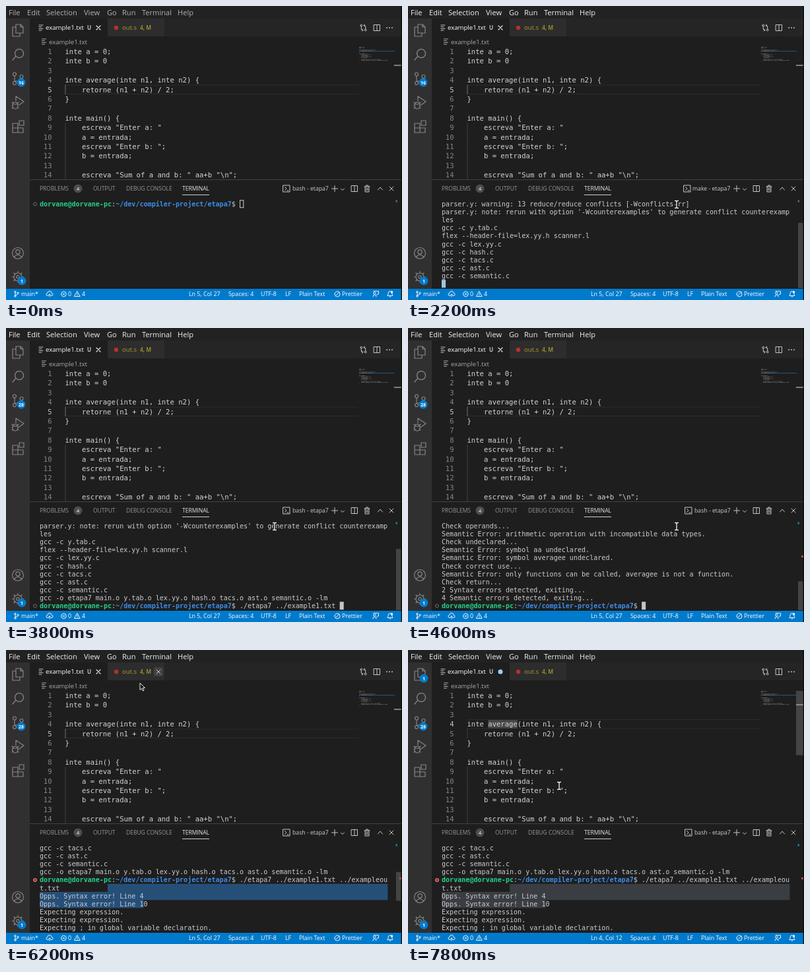
Write an HTML page that moves like this. It is 600 px wide and 446 px high and loops after 8 s.

```html
<!DOCTYPE html>
<html lang="en">
<head>
<meta charset="utf-8">
<title>Compiler demo</title>
<style>
html, body { margin: 0; width: 100%; height: 100%; overflow: hidden; background: #1e1e1e; }
svg { display: block; width: 600px; height: 446px; }
text { white-space: pre; font-family: "Open Sans", "Noto Sans", sans-serif; }
.mono { font-family: "DejaVu Sans Mono", monospace; }
.code { font-size: 10.57px; }
.term { font-size: 10.07px; }
.line { fill: none; stroke-linecap: round; stroke-linejoin: round; }
</style>
</head>
<body>
<svg id="stage" viewBox="0 0 600 446"></svg>
<script>
const LOOP = 8000, STEP = 200;
const CODE = { x: 89.5, y: 62, pitch: 14.4, char: 6.365, bottom: 264 };
const TERM = { x: 51, y: 294.3, pitch: 12.1, char: 6.062, rows: 11, cols: 87 };
const USER = 'dorvane@dorvane-pc', PATH = '~/dev/compiler-project/etapa7';
const prompt = command => `${USER}:${PATH}$ ${command}`;
const RUN = './etapa7 ../example1.txt ../exampleout.txt';

const source = `inte a = 0;
inte b = 0

inte average(inte n1, inte n2) {
    retorne (n1 + n2) / 2;
}

inte main() {
    escreva "Enter a: "
    a = entrada;
    escreva "Enter b: ";
    b = entrada;

    escreva "Sum of a and b: " aa+b "\\n";
    escreva "Average of a and b: " averagee(a, b) "\\n";
}`.split('\n');

const log = `${prompt('make')}
gcc -c main.c
bison -y -d parser.y
parser.y: warning: 2 shift/reduce conflicts [-Wconflicts-sr]
parser.y: warning: 13 reduce/reduce conflicts [-Wconflicts-rr]
parser.y: note: rerun with option '-Wcounterexamples' to generate conflict counterexamples
gcc -c y.tab.c
flex --header-file=lex.yy.h scanner.l
gcc -c lex.yy.c
gcc -c hash.c
gcc -c tacs.c
gcc -c ast.c
gcc -c semantic.c
gcc -o etapa7 main.o y.tab.o lex.yy.o hash.o tacs.o ast.o semantic.o -lm
${prompt(RUN)}
Opps. Syntax error! Line 4
Opps. Syntax error! Line 10
Expecting expression.
Expecting expression.
Expecting ; in global variable declaration.
Check declarations...
Check operands...
Semantic Error: arithmetic operation with incompatible data types.
Check undeclared...
Semantic Error: symbol aa undeclared.
Semantic Error: symbol averagee undeclared.
Check correct use...
Semantic Error: only functions can be called, averagee is not a function.
Check return...
2 Syntax errors detected, exiting...
4 Semantic errors detected, exiting...`.split('\n');

// Each table row is [start in ms, value, ...].
const editorScroll = [[0, 0], [800, 25], [1000, 50], [1400, 25], [1600, 0]];
const session = [ // finished log lines, then typed text (null while a command runs)
  [0, 0, ''], [1800, 0, 'mak'], [2000, 7, null], [2200, 13, null], [2600, 14, ''],
  [3400, 14, './eta'], [3600, 14, './etapa7 ../ex'], [3800, 14, './etapa7 ../example1.txt '],
  [4000, 14, './etapa7 ../example1.txt ../example'], [4200, 14, RUN], [4400, log.length, '']
];
const termTop = [[0, null], [5000, 18], [5200, 11]];
const selectTo = [[0, null], [5400, [16, 24]], [5600, [17, 12]], [5800, [18, 26]]];
const caret = [[0, 5, 27], [6800, 2, 11], [7000, 2, 12], [7400, 4, 12]];
const mousePath = [
  [200, 452, 214], [600, 483.5, 176], [1400, 483.5, 176], [1800, 407, 301], [5200, 407, 301],
  [5400, 155, 361], [5800, 209, 386], [6000, 207, 180], [6200, 203, 50], [6400, 198, 58],
  [6600, 166, 85], [7000, 166, 85], [7400, 148, 113], [7800, 229, 206]
];

const at = (table, t) => table.filter(row => row[0] <= t).pop();

function mouseAt(t) {
  if (t < mousePath[0][0]) return null;
  const i = mousePath.findIndex(p => p[0] > t);
  if (i < 0) return mousePath[mousePath.length - 1].slice(1);
  const [a, b] = [mousePath[i - 1], mousePath[i]];
  const k = (t - a[0]) / (b[0] - a[0]);
  return [a[1] + (b[1] - a[1]) * k, a[2] + (b[2] - a[2]) * k];
}

const esc = s => s.replace(/&/g, '&amp;').replace(/</g, '&lt;');
const rect = (x, y, w, h, fill, more = '') =>
  `<rect x="${x}" y="${y}" width="${w}" height="${h}" fill="${fill}" ${more}/>`;
const disc = (x, y, r, fill, more = '') => `<circle cx="${x}" cy="${y}" r="${r}" fill="${fill}" ${more}/>`;
const label = (x, y, s, size, fill, more = '') =>
  `<text x="${x}" y="${y}" font-size="${size}" fill="${fill}" ${more}>${esc(s)}</text>`;
const mono = (x, y, s, kind, fill, more = '') =>
  `<text class="mono ${kind}" x="${x}" y="${y}" fill="${fill}" ${more}>${esc(s)}</text>`;
const icon = (x, y, d, color = '#c5c5c5', width = 1) =>
  `<path class="line" transform="translate(${x} ${y})" d="${d}" stroke="${color}" stroke-width="${width}"/>`;
const ring = (r, x = 0, y = 0) => `M${x - r} ${y}a${r} ${r} 0 1 0 ${2 * r} 0a${r} ${r} 0 1 0 ${-2 * r} 0`;
const badge = (x, y, s) => disc(x, y, 6.5, '#007acc') +
  label(x, y + 2.5, s, 7, '#fff', 'text-anchor="middle" font-weight="700"');

const CROSS = 'M-3-3L3 3M3-3L-3 3';
const TEXT_FILE = 'M-3-4H3M-3-1.3H1M-3 1.4H3M-3 4H1';
const SPLIT = 'M-4.5-4.5H4.5V4.5H-4.5ZM0-4.5V4.5';

function menuBar(t) {
  const items = [[4, 'File'], [32, 'Edit'], [61, 'Selection'], [118, 'View'], [153, 'Go'],
    [176, 'Run'], [206, 'Terminal'], [260, 'Help']];
  return rect(0, 0, 600, 19, '#222') +
    items.map(([x, s]) => label(x, 13.6, s, 11.1, t < 200 ? '#b0b0b0' : '#f0f0f0')).join('');
}

function activityBar(t) {
  const gray = '#858585', put = (y, d) => icon(18, y, d, gray, 1.2);
  const teeth = Array.from({ length: 8 }, (_, i) => {
    const c = Math.cos(i * Math.PI / 4), s = Math.sin(i * Math.PI / 4);
    return `M${c * 6} ${s * 6}L${c * 8.5} ${s * 8.5}`;
  }).join('');
  return rect(0, 19, 36, 411, '#303030') +
    put(37, 'M-3-9H4L8-5V4H-3ZM4-9V-5H8M-3-5H-8V9H3V4') +
    put(73, 'M-3 3L-8 9M-3 3a6.5 6.5 0 1 1 1 1Z') +
    put(110, `M-5-4V5M5.5 0Q5 4-4 4${ring(2.5, -5, -6.5)}${ring(2.5, -5, 7)}${ring(2.5, 5.5, -3)}`) +
    put(146, 'M-3-2V-9L9-1L2 4M-8 4a4 4 0 0 1 8 0V6a4 4 0 0 1-8 0ZM-8 3H0M-9 0L-7 2M1 0L-1 2M-9 5H-8M0 5H1M-9 9L-7 8M1 9L-1 8') +
    put(183, 'M-8-5H0V9H-8ZM-8 2H8V9H0M0 2V9M2-9H9V-2H2Z') +
    put(375, `${ring(8.5)}${ring(3.2, 0, -2)}M-6 6Q0-1 6 6`) +
    put(411, `${ring(6)}${ring(2.2)}${teeth}`) +
    (t >= 7000 ? badge(24, 43, '1') : '') +
    badge(23, 116, t < 2600 ? '16' : '28') + badge(24, 417, '1');
}

function tabs(t) {
  const olive = '#aa9c2c', hover = t >= 6200 && t < 6400;
  return rect(36, 19, 564, 27, '#252526') + rect(36, 19, 118, 27, '#1e1e1e') +
    rect(154, 19, 86, 27, '#2d2d2d') +
    icon(53, 33, TEXT_FILE) + label(60, 36.4, 'example1.txt', 9.6, '#fff') +
    label(123, 36, 'U', 8.2, '#eee', 'font-weight="600"') +
    (t >= 7000 ? disc(140, 33, 3.5, '#9bd0ee') : icon(140, 33, CROSS, '#e5e5e5', 1.2)) +
    disc(167, 33, 3.2, '#b5322c') + label(176, 36.4, 'out.s', 9.6, olive) +
    label(203, 36, '4, M', 8.5, olive, 'font-weight="600"') +
    (hover ? rect(224, 26, 14, 14, '#414141', 'rx="3"') + icon(231, 33, CROSS, '#ccc') : '') +
    icon(541.5, 33, `${ring(1.4, -3.2, -3.4)}${ring(1.4, 3.2, 3.4)}M-3.2-2V2Q-3.2 3.6-1 3.6M-2 2L-.4 3.6L-2 5.2M3.2 2V-2Q3.2-3.6 1-3.6M2-5.2L.4-3.6L2-2`) +
    icon(562, 33, SPLIT) + icon(581, 33, 'M-4 0h.1M0 0h.1M4 0h.1', '#c5c5c5', 1.8) +
    icon(57.5, 54, TEXT_FILE, '#aaa') + label(65, 57.5, 'example1.txt', 9.6, '#a9a9a9');
}

function editor(t) {
  const scroll = at(editorScroll, t)[1], [, row] = at(caret, t), mouse = mouseAt(t);
  const top = n => CODE.y + (n - 1) * CODE.pitch - scroll;
  let out = '';
  source.forEach((text, i) => {
    const n = i + 1, y = top(n), active = n === row;
    if (y < 45 || y > CODE.bottom) return;
    if (n === 2 && t >= 6800) text += ';';
    if (active) {
      out += rect(89, y, 445, 1, '#2c2c2c') + rect(89, y + CODE.pitch - 1, 445, 1, '#2c2c2c');
      if (n === 4) out += rect(CODE.x + 5 * CODE.char, y + 1, 7 * CODE.char, CODE.pitch - 2, '#494949');
    }
    if (n === 5 || n > 8 && n < 16) out += rect(89.5, y, 1, CODE.pitch, n === 5 && active ? '#707070' : '#404040');
    out += mono(69.5, y + 11, String(n), 'code', active ? '#c6c6c6' : '#858585', 'text-anchor="end"');
    out += mono(CODE.x, y + 11, text, 'code', '#d4d4d4');
  });
  out = `<g clip-path="url(#code)">${out}</g>`;

  out += rect(535, 68, 54, 1, '#26557f');
  source.forEach((text, i) => {
    for (const word of text.matchAll(/\S+/g))
      out += rect(535 + word.index * .78, 62 + i * 1.44, word[0].length * .78, .9, '#aaa', 'opacity=".45"');
  });
  const overEditor = mouse && mouse[1] > 62 && mouse[1] < 264;
  if (overEditor) out += rect(588, 62 + scroll * .483, 11, 97.6, '#797979', 'opacity=".42"');
  return out + rect(588, 89.3 + (row - 5) * 6.95, 11, 1.5, '#a0a0a0');
}

function panelHeader(t) {
  const running = at(session, t)[2] === null;
  const dim = '#969696';
  return rect(36, 263, 564, 167, '#1e1e1e') + rect(36, 263, 564, 1, '#414141') +
    label(51, 280, 'PROBLEMS', 8.5, dim) + disc(109, 277, 6.5, '#4d4d4d') +
    label(109, 280, '4', 8, '#fff', 'text-anchor="middle"') +
    label(132, 280, 'OUTPUT', 8.5, dim) + label(182, 280, 'DEBUG CONSOLE', 8.5, dim) +
    label(267, 280, 'TERMINAL', 8.5, '#e7e7e7') + rect(267, 286, 41, 1, '#d0d0d0') +
    icon(running ? 423 : 425, 277, 'M-5-5H5V5H-5ZM-2.5-2.5L0 0L-2.5 2.5M1 3H3') +
    label(running ? 431 : 434, 280, (running ? 'make' : 'bash') + ' - etapa7', 8.7, '#ccc') +
    icon(498, 277, 'M-4.5 0H4.5M0-4.5V4.5') + icon(510, 278, 'M-2.5-1L0 1.5L2.5-1') +
    icon(528, 277, SPLIT) + icon(547, 277, 'M-4-3H4M-1.5-3V-5H1.5V-3M-3-3V5H3V-3M-1-1V3M1-1V3') +
    icon(567, 277, 'M-3.5 2L0-2L3.5 2') + icon(584, 277, CROSS);
}

function terminal(t) {
  const [, done, typed] = at(session, t);
  const lines = [...log.slice(0, done), typed === null ? '' : prompt(typed)];
  const rows = lines.flatMap(s => s.match(new RegExp(`.{1,${TERM.cols}}`, 'g')) || ['']);
  const first = at(termTop, t)[1] ?? Math.max(0, rows.length - TERM.rows);
  const selection = at(selectTo, t)[1];
  const top = n => TERM.y + (n - first) * TERM.pitch;
  let out = '';

  if (selection) {
    const [endRow, endCol] = selection, color = t < 6600 ? '#264f78' : '#3a3d41';
    for (let n = 16; n <= endRow; n++) {
      const from = n === 16 ? 17 : 0, to = n === endRow ? endCol : TERM.cols;
      out += rect(TERM.x + from * TERM.char, top(n), (to - from) * TERM.char, TERM.pitch + .3, color);
    }
  }
  rows.slice(first, first + TERM.rows).forEach((text, i) => {
    const n = first + i, y = top(n) + 9.7;
    if (!text.startsWith(USER)) { out += mono(TERM.x, y, text, 'term', '#ccc'); return; }
    const rest = text.slice(USER.length + 1 + PATH.length);
    out += `<text class="mono term" x="${TERM.x}" y="${y}" fill="#ccc"><tspan fill="#23d18b" font-weight="700">${USER}</tspan>:<tspan fill="#3b8eea" font-weight="700">${PATH}</tspan>${rest}</text>`;
    const failed = n === 15 && done > 14;
    out += failed ? disc(44, y - 3.5, 3, '#e0635a') + icon(44, y - 3.5, 'M-1-1L1 1M1-1L-1 1', '#1e1e1e', .8)
      : n === 0 && done ? disc(44, y - 3.5, 2.6, '#1b81a8') : icon(44, y - 3.5, ring(2.5), '#777', .9);
  });

  const last = rows.length - 1;
  if (last < first + TERM.rows) {
    const x = TERM.x + rows[last].length * TERM.char;
    out += t < 1800
      ? rect(x + .5, top(last) + .5, 5.2, 11, 'none', 'stroke="#ccc"')
      : rect(x, top(last), TERM.char, 12, typed === null ? '#9cc8dc' : '#c4c4c4');
  }
  if (rows.length > TERM.rows && t < 6600)
    out += rect(591, 293 + first / rows.length * 135, 7.5, TERM.rows / rows.length * 135, '#797979', 'opacity=".42"');
  out += rect(590.5, 294.5, 2.5, 3, done > 13 ? '#1b81a8' : '#666');
  if (done > 14) out += rect(596, 345, 3, 3, '#c74e45');
  return out;
}

function statusBar(t) {
  const [, row, col] = at(caret, t), white = '#fff';
  const items = [[23, 'main*'], [94, '0'], [115, '4'], [277, `Ln ${row}, Col ${col}`], [337, 'Spaces: 4'],
    [386, 'UTF-8'], [423, 'LF'], [444, 'Plain Text'], [509, 'Prettier']];
  return rect(0, 429, 600, 17, '#007acc') +
    items.map(([x, s]) => label(x, 440.3, s, 8.9, white)).join('') +
    icon(16, 437, `M-2-2V2M2 0Q2 1.5-2 1.5${ring(1.2, -2, -3.2)}${ring(1.2, -2, 3.2)}${ring(1.2, 2.2, -1.5)}`, white, .9) +
    icon(66, 437, 'M-2 2.5H-3a2 2 0 0 1 0-4a3 3 0 0 1 6 0a2 2 0 0 1 0 4H2M0 4V0M-1.5 1.5L0 0L1.5 1.5', white, .9) +
    icon(87.5, 437, `${ring(3.8)}M-1.4-1.4L1.4 1.4M1.4-1.4L-1.4 1.4`, white, .9) +
    icon(108, 437, 'M0-4L4.2 3.5H-4.2ZM0-1.2V1M0 2.3v.1', white, .9) +
    icon(502, 437, `${ring(4)}M-2.8 2.8L2.8-2.8`, white, .9) +
    icon(560, 437, `M-4 4Q-4 1-1.5 1Q1 1 1 4M-3-4.3H4.5V0H3L1.5 1.5${ring(1.7, -1.6, -1.5)}`, white, .9) +
    icon(582, 437, 'M-4 2.5H4L3 .8V-1.2a3 3 0 0 0-6 0V.8ZM-1 4H1', white, .9) + disc(584.5, 434, 1.7, white);
}

const windowEdge = () => rect(598.7, 0, 1.3, 446, '#0a0a0a');

function pointer(t) {
  const mouse = mouseAt(t);
  if (!mouse) return '';
  const [x, y] = mouse;
  if (y < 62) return `<path transform="translate(${x} ${y})" d="M0 0V10.5L2.5 8.2L4.2 12L6 11.2L4.3 7.5H7.5Z" fill="#111" stroke="#fff" stroke-width=".9"/>`;
  const beam = 'M-2.5-5.5H-1Q0-5.5 0-4.5Q0-5.5 1-5.5H2.5M0-4.5V4.5M-2.5 5.5H-1Q0 5.5 0 4.5Q0 5.5 1 5.5H2.5';
  return icon(x, y, beam, '#111', 2.8) + icon(x, y, beam, '#fff', 1.3);
}

const parts = [editor, menuBar, activityBar, tabs, panelHeader, terminal, statusBar, windowEdge, pointer];
const stage = document.getElementById('stage');
const defs = '<clipPath id="code"><rect x="36" y="62" width="498" height="202"/></clipPath>';
let shown = -1;

function draw(now) {
  const t = Math.floor(now % LOOP / STEP) * STEP;
  if (t !== shown) {
    shown = t;
    stage.innerHTML = defs + rect(0, 0, 600, 446, '#1e1e1e') + parts.map(part => part(t)).join('');
  }
  requestAnimationFrame(() => draw(performance.now() - start));
}
const start = performance.now();
draw(0);
</script>
</body>
</html>
```
